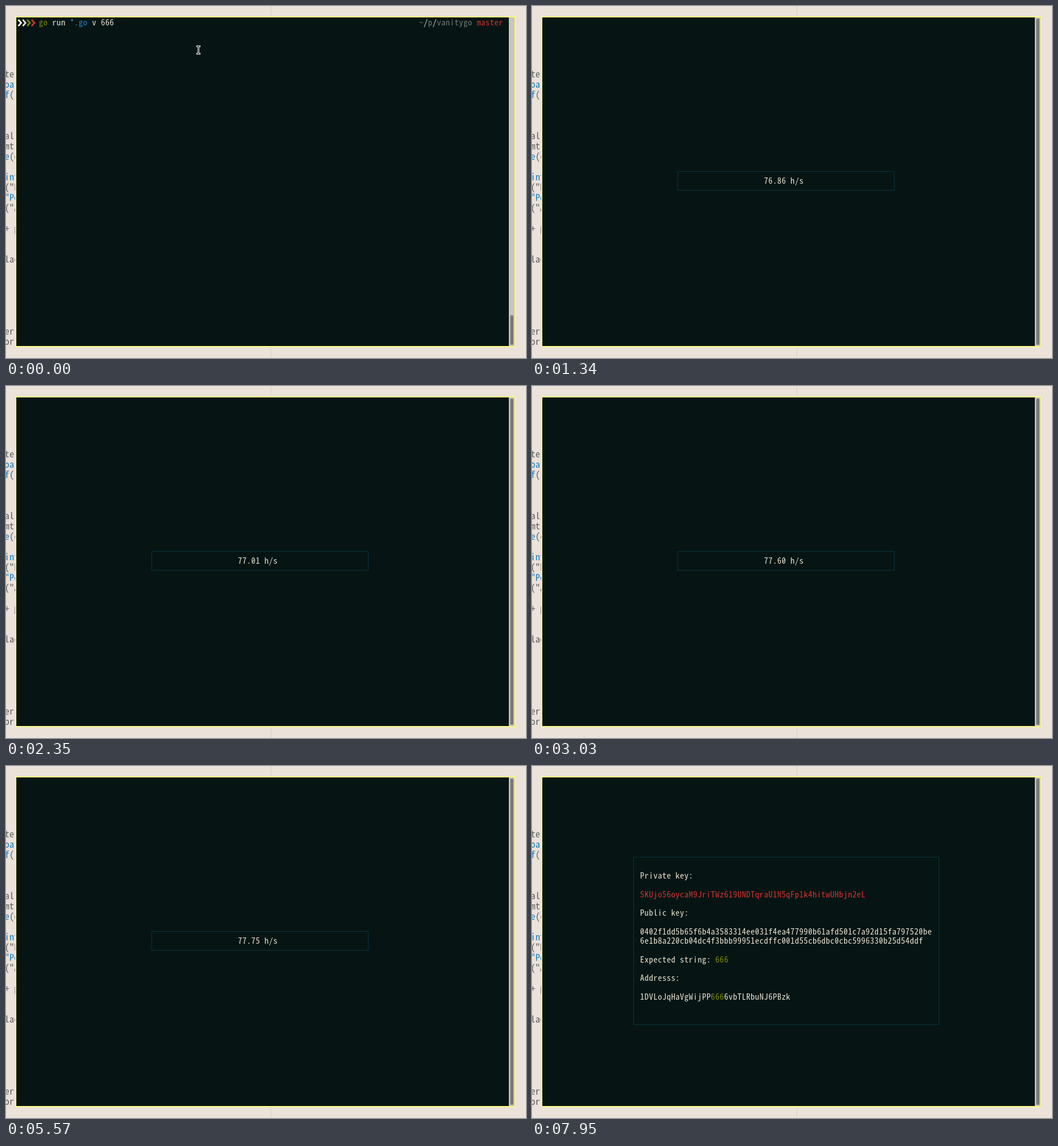
Write an HTML page with a canvas that moves like this. It is 908 px wide and 616 px high and loops after 8 s.

```html
<!DOCTYPE html>
<html lang="en">
<head>
<meta charset="utf-8">
<title>Vanity address search</title>
<style>
html, body { margin: 0; width: 908px; height: 616px; overflow: hidden; background: #ebe2d9; }
canvas { display: block; }
</style>
</head>
<body>
<canvas id="stage" width="908" height="616"></canvas>
<script>
const ctx = document.getElementById('stage').getContext('2d');
const MONO = '"Noto Sans Mono CJK JP", "Noto Sans Mono CJK SC", "Noto Sans Mono", monospace';
const LOOP = 8000, START = 670, FOUND = 7950;
const CELL = 7.72, ROW = 16.3, LEFT = 19, BASE = 34, CODE_CELL = 8.2;
const CREAM = '#e8e2d0', RED = '#d6322e', OLIVE = '#7f8a0a', BLUE = '#2688cc', MUTED = '#6f7c79';
const DARK = '#061514', FRAME = '#0a3340', GREY = '#5b5d5b', CODE_BLUE = '#1c7cb8';

// Editor lines behind the window; text before a bar is highlighted
const CODE = `te
oa|r
f|(



al.
mt.
e|(c

int|
("P
"Po|
("A

+ p


lac






er
or"`;

// The measured speed drifts evenly between these moments
const RATE = [[START, 74.9], [1340, 76.86], [2350, 77.01], [3030, 77.6], [4340, 77.64], [6760, 77.85], [FOUND, 77.96]];

function rateAt(t) {
  const next = Math.max(1, RATE.findIndex(([time]) => time >= t));
  const [t0, v0] = RATE[next - 1], [t1, v1] = RATE[next];
  return (v0 + (v1 - v0) * (t - t0) / (t1 - t0)).toFixed(2);
}

function rect(x, y, w, h, color) {
  ctx.fillStyle = color;
  ctx.fillRect(x, y, w, h);
}

function setFont(size, pitch) {
  ctx.letterSpacing = '0px';
  ctx.font = `${size}px ${MONO}`;
  ctx.letterSpacing = pitch - ctx.measureText('0').width + 'px';
}

function stroke(color, width, ...points) {
  ctx.strokeStyle = color;
  ctx.lineWidth = width;
  ctx.beginPath();
  for (const [x, y] of points) ctx.lineTo(x, y);
  ctx.stroke();
}

// Draws alternating colour, text pairs on one line, with slashed zeros
function runs(x, y, pitch, ...parts) {
  for (let i = 0; i < parts.length; i += 2) {
    const [color, text] = parts.slice(i, i + 2);
    ctx.fillStyle = color;
    ctx.fillText(text, x, y);
    for (const { index } of text.matchAll(/0/g)) {
      const zero = x + index * pitch;
      stroke(color, 1, [zero + 2.2, y - 2.5], [zero + 5, y - 8]);
    }
    x += text.length * pitch;
  }
}

function line(col, row, ...parts) {
  runs(LEFT + col * CELL, BASE + row * ROW, CELL, ...parts);
}

function box(x, y, w, h) {
  ctx.strokeStyle = FRAME;
  ctx.lineWidth = 1;
  ctx.strokeRect(x + 0.5, y + 0.5, w, h);
}

function drawEditor() {
  rect(0, 0, 908, 616, '#ebe2d9');
  rect(462, 0, 1, 616, '#d8d0c8');
  setFont(16, CODE_CELL);
  CODE.split('\n').forEach((text, i) => {
    const [rest, blue = ''] = text.split('|').reverse();
    runs(-2.2, 125 + i * 18, CODE_CELL, CODE_BLUE, blue, GREY, rest);
  });
}

function drawWindow(running) {
  rect(16, 18, 874, 579, '#f8f97e');
  rect(18, 20, 860, 575, DARK);
  rect(878, 20, 10, 575, '#cbc5ba');
  const top = running ? 22 : 541;
  ctx.fillStyle = '#7a7976';
  ctx.beginPath();
  ctx.roundRect(880.5, top, 5.5, 593 - top, 2.5);
  ctx.fill();
}

function drawPointer() {
  for (const [width, color] of [[3, '#f0f2f2'], [1, '#101818']]) {
    const pad = width / 2;
    for (const y of [70.5, 83.5]) stroke(color, width, [334 - pad, y], [338 + pad, y]);
    stroke(color, width, [336, 70.5], [336, 83.5]);
  }
}

function drawPrompt(t) {
  ['#ffffff', CREAM, OLIVE, RED].forEach((color, i) => {
    const x = 21.5 + i * CELL;
    stroke(color, 2.7, [x, 24], [x + 5, 29.5], [x, 35]);
  });
  line(5, 0, OLIVE, 'go ', CREAM, 'run ', BLUE, '*.go ', CREAM, 'v 666');
  line(91, 0, MUTED, '~', CREAM, '/', MUTED, 'p', CREAM, '/', MUTED, 'vanitygo ', RED, 'master');
  if (t >= 220) rect(19, 37, 8, 16, '#93a1a1');
  if (t < 330) drawPointer();
}

function drawRate(t) {
  box(254, 289, 378, 33);
  line(50, 17, CREAM, rateAt(t) + ' h/s');
}

function drawResult() {
  box(177, 159, 533, 293);
  line(22, 10, CREAM, 'Private key:');
  line(22, 12, RED, '5KUjo56oycaM9JriTWz619UNDTqraU1N5qFp1k4hitwUHbjn2eL');
  line(22, 14, CREAM, 'Public key:');
  line(22, 16, CREAM, '0402f1dd5b65f6b4a3583314ee031f4ea477990b61afd501c7a92d15fa797520be');
  line(22, 17, CREAM, '6e1b8a220cb04dc4f3bbb99951ecdffc001d55cb6dbc0cbc5996330b25d54ddf');
  line(22, 19, CREAM, 'Expected string: ', OLIVE, '666');
  line(22, 21, CREAM, 'Addresss:');
  line(22, 23, CREAM, '1DVLoJqHaVgWijPP', OLIVE, '666', CREAM, '6vbTLRbuNJ6PBzk');
}

function draw() {
  const t = performance.now() % LOOP;
  drawEditor();
  drawWindow(t >= START);
  setFont(14.4, CELL);
  if (t < START) drawPrompt(t);
  else if (t < FOUND) drawRate(t);
  else drawResult();
  requestAnimationFrame(draw);
}
draw();
</script>
</body>
</html>
```
